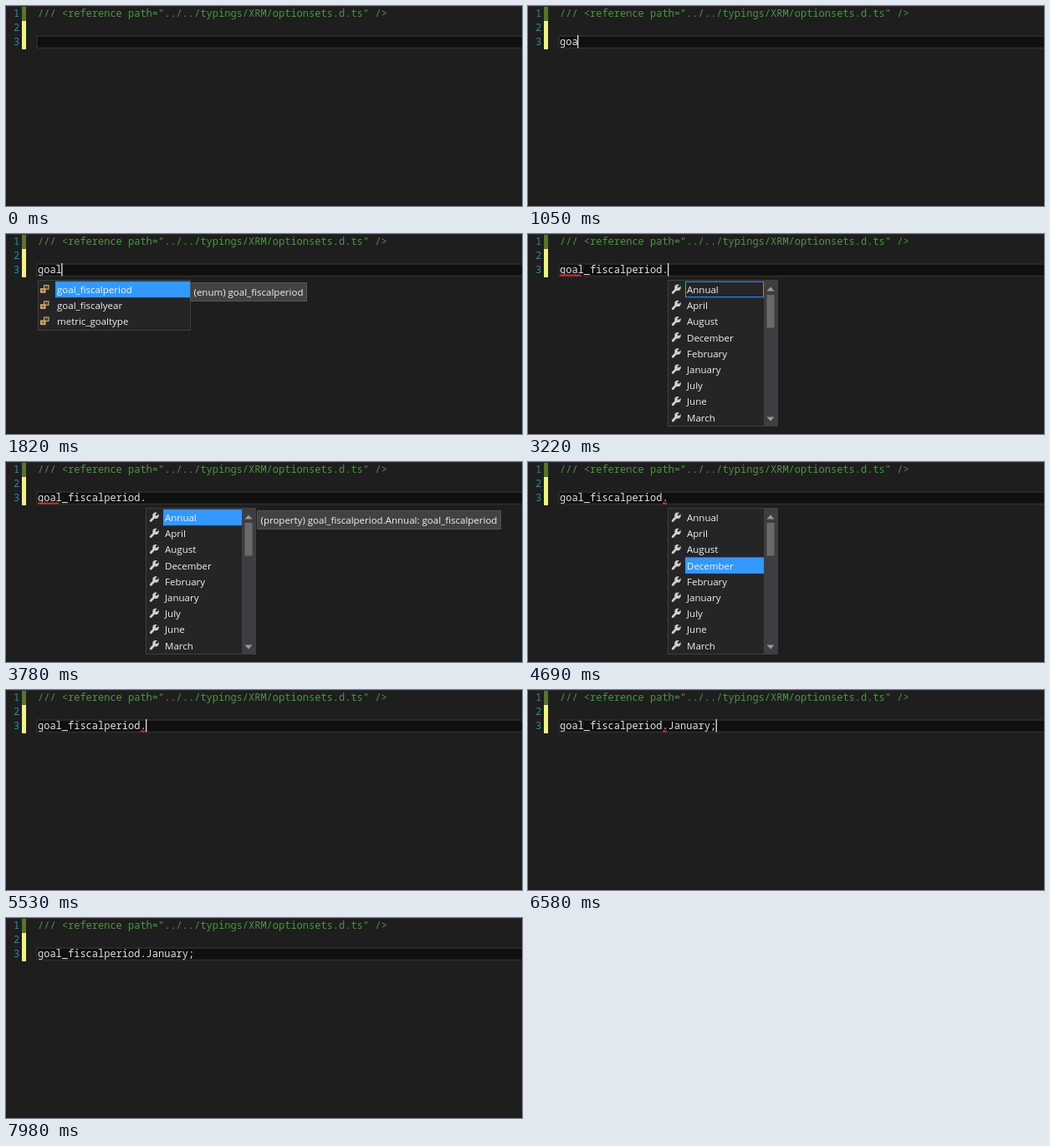
Write an HTML page that moves like this. It is 617x240 px and loops after 8050 ms.

```html
<!DOCTYPE html>
<html lang="en">
<head>
<meta charset="utf-8">
<title>Option set completion</title>
<style>
  html, body { margin: 0; width: 100%; height: 100%; overflow: hidden; background: #1e1e1e; }
  svg { display: block; width: 617px; height: 240px; }
  .code { font: 12px "Noto Sans Mono", "DejaVu Sans Mono", monospace; white-space: pre; fill: #e2e2e2; }
  .ui { font: 11.5px "Open Sans", "Noto Sans", sans-serif; fill: #f1f1f1; }
  .num { fill: #2b8a9f; }
  .comment { fill: #4f9443; }
  .panel { fill: #252526; stroke: #3f3f46; }
  .tip { fill: #424245; stroke: #545458; }
  .squiggle { fill: none; stroke: #e0332c; stroke-width: 1.1; }
</style>
</head>
<body>
<svg id="stage" viewBox="0 0 617 240" xmlns="http://www.w3.org/2000/svg">
  <rect width="617" height="240" fill="#1e1e1e"/>
  <rect width="617" height="1" fill="#2b2b2d"/>
  <rect x="19" y="1" width="5" height="17" fill="#577430"/>
  <rect x="19" y="18" width="5" height="34" fill="#eff284"/>
  <rect x="37" y="36" width="590" height="14.5" fill="#0f0f0f" stroke="#2d2d2d" stroke-width="1.6"/>
  <g class="code">
    <text class="num" x="9" y="13">1</text>
    <text class="num" x="9" y="30">2</text>
    <text class="num" x="9" y="47">3</text>
    <text class="comment" x="38" y="13">/// &lt;reference path="../../typings/XRM/optionsets.d.ts" /&gt;</text>
    <text id="typed" x="38" y="47"></text>
  </g>
</svg>
<script>
const LOOP = 8050, CHAR = 7.2, LEFT = 38, ROW = 19.2;
const stage = document.getElementById('stage');
const typed = document.getElementById('typed');

function add(parent, tag, attrs, text) {
  const el = document.createElementNS('http://www.w3.org/2000/svg', tag);
  for (const k in attrs) el.setAttribute(k, attrs[k]);
  if (text) el.textContent = text;
  parent.appendChild(el);
  return el;
}

const group = () => add(stage, 'g', { class: 'ui' });

function squiggle(from, to) {
  let d = `M${from} 50.5`;
  for (let x = from + 1.7, up = true; x <= to; x += 1.7, up = !up) d += `L${x.toFixed(1)} ${up ? 48.3 : 50.5}`;
  return add(stage, 'path', { class: 'squiggle', d });
}

function enumIcon(g, y) {
  const box = { width: 5.5, height: 4.5, fill: '#4a3d28', stroke: '#c9a468', 'stroke-width': 1.2 };
  add(g, 'rect', { ...box, x: 45.5, y: y - 5 });
  add(g, 'rect', { ...box, x: 41.5, y: y - 1, fill: '#c9a468' });
  add(g, 'path', { d: `M43 ${y + 1.2}h2.6`, stroke: '#252526' });
}

function wrenchIcon(g, y) {
  const cx = 179, cy = y - 2.4;
  add(g, 'path', { d: `M${cx - 1} ${cy + 1}L173.2 ${y + 3.8}`, stroke: '#cfcfcf', 'stroke-width': 2.8, 'stroke-linecap': 'round' });
  add(g, 'circle', { cx, cy, r: 3.7, fill: '#cfcfcf' });
  add(g, 'path', { d: `M${cx + .2} ${cy - .2}l4 -4`, stroke: '#252526', 'stroke-width': 2.4 });
}

// A completion list: panel, movable highlight, icons and labels.
function makeList(items, x, width, height, icon) {
  const g = group();
  add(g, 'rect', { class: 'panel', x: x + .5, y: 55.5, width: width - 1, height });
  const mark = add(g, 'rect', { x: x + 21.5, width: 0, height: 18.4, stroke: '#3399ff' });
  items.forEach((name, i) => {
    const y = 66.6 + i * ROW;
    icon(g, y);
    add(g, 'text', { x: x + 23, y: y + 4.4 }, name);
  });
  return { g, mark };
}

function makeTip(x, width, text) {
  const g = group();
  add(g, 'rect', { class: 'tip', x: x + .5, y: 58.5, width: width - 1, height: 22 });
  add(g, 'text', { x: x + 4.5, y: 74 }, text);
  return g;
}

const names = makeList(['goal_fiscalperiod', 'goal_fiscalyear', 'metric_goaltype'], 38, 183, 60, enumIcon);
names.mark.setAttribute('x', 59.5);
names.mark.setAttribute('width', 160);

const months = makeList(
  ['Annual', 'April', 'August', 'December', 'February', 'January', 'July', 'June', 'March'],
  167, 132, 175, wrenchIcon);
months.mark.setAttribute('width', 93);
add(months.g, 'rect', { x: 282, y: 56, width: 16.5, height: 174.5, fill: '#3e3e42' });
add(months.g, 'rect', { x: 285.5, y: 73, width: 9, height: 39.5, fill: '#6a6a6a' });
add(months.g, 'path', { d: 'M285.5 68.5h9l-4.5 -5zM285.5 219.5h9l-4.5 5z', fill: '#999' });

const lists = { names, months };
const tips = {
  names: makeTip(220, 140, '(enum) goal_fiscalperiod'),
  months: makeTip(300, 292, '(property) goal_fiscalperiod.Annual: goal_fiscalperiod')
};
const marks = { word: squiggle(38, 65), dot: squiggle(161, 167) };
const caret = add(stage, 'rect', { y: 35, width: 1.3, height: 15.5, fill: '#e2e2e2' });

// Each step gives only what changes at that time.
const word = 'goal_fiscalperiod';
const steps = [
  [0, { text: '', caret: 0, list: '', row: 0, solid: 1, tip: 0, error: '' }],
  [350, { caret: 1 }],
  [700, { text: 'g' }],
  [840, { text: 'go' }],
  [980, { text: 'goa' }],
  [1120, { text: 'goal' }],
  [1260, { list: 'names', caret: 0 }],
  [1680, { tip: .35 }],
  [1750, { tip: .7, caret: 1 }],
  [1820, { tip: 1 }],
  [2240, { caret: 0 }],
  [2310, { text: word, list: '', tip: 0 }],
  [2380, { caret: 1 }],
  [2660, { text: word + '.' }],
  [2730, { list: 'months', solid: 0, caret: 0 }],
  [3220, { caret: 1, error: 'word' }],
  [3360, { solid: 1 }],
  [3640, { tip: .35 }],
  [3710, { tip: .7, caret: 0 }],
  [3780, { tip: 1 }],
  [3850, { error: 'dot' }],
  [4130, { row: 1, tip: 0 }],
  [4200, { caret: 1 }],
  [4480, { row: 2 }],
  [4620, { row: 3 }],
  [4690, { caret: 0 }],
  [4900, { row: 4 }],
  [5110, { row: 5, caret: 1 }],
  [5530, { list: '' }],
  [5600, { text: word + '.January' }],
  [5950, { text: word + '.January;' }],
  [6090, { caret: 0 }],
  [6580, { caret: 1 }],
  [7070, { caret: 0 }],
  [7350, { error: '' }],
  [7490, { caret: 1 }],
  [7980, { caret: 0 }]
];

const show = (el, opacity) => el.setAttribute('opacity', opacity);

function draw(time) {
  const s = {};
  for (const [at, change] of steps) if (at <= time) Object.assign(s, change);

  typed.textContent = s.text;
  caret.setAttribute('x', LEFT - .6 + s.text.length * CHAR);
  show(caret, s.caret);
  for (const key in lists) {
    const { g, mark } = lists[key];
    show(g, s.list === key ? 1 : 0);
    show(tips[key], s.list === key ? s.tip : 0);
    mark.setAttribute('y', 57.3 + s.row * ROW);
    mark.setAttribute('fill', s.solid ? '#3399ff' : 'none');
  }
  for (const key in marks) show(marks[key], s.error === key ? 1 : 0);
}

const start = performance.now();
function frame() {
  draw((performance.now() - start) % LOOP);
  requestAnimationFrame(frame);
}
frame();
</script>
</body>
</html>
```
